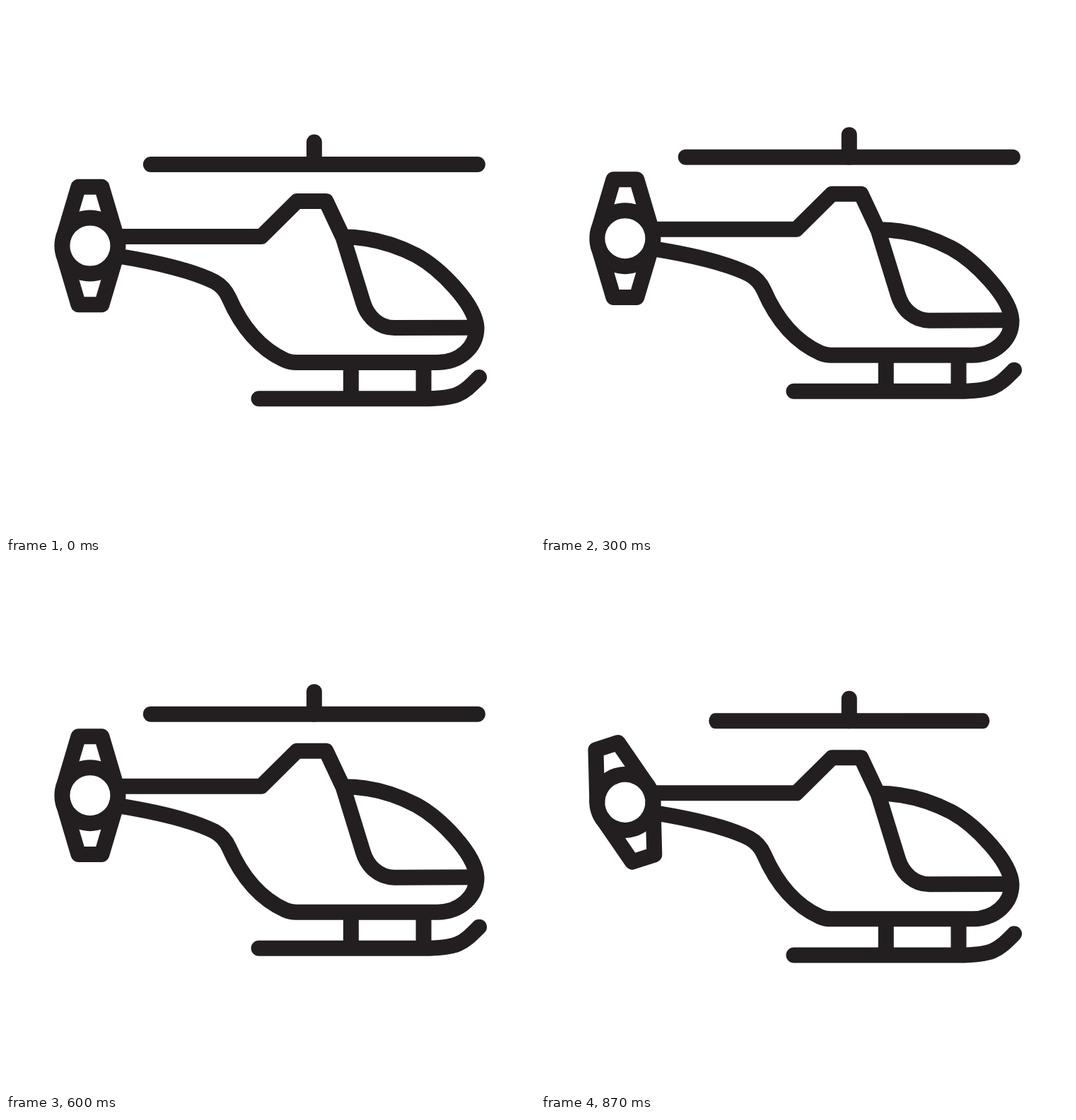
Animation of 748 by 748 pixels, one loop 900 ms. Source, as an HTML page:

```html
<!DOCTYPE html>
<html lang="en">
<head>
<meta charset="utf-8">
<title>Helicopter</title>
<style>
  html, body { margin: 0; width: 100%; height: 100%; overflow: hidden; background: #fff; }
  svg { display: block; width: 100vw; height: 100vh; }
  g { fill: none; stroke: #231f20; stroke-width: 22; stroke-linejoin: round; }
  .round { stroke-linecap: round; }
</style>
</head>
<body>
<svg viewBox="0 0 748 748">
  <g id="craft">
    <!-- fuselage -->
    <path d="M158 326H361L411.5 276H452.5L476.7 327.5L504.7 418.5C511 440 528 455 549 455L662 454.7"/>
    <path d="M476.7 326.5C516 326.5 550 337 580 352.5C614 371 664 422 665.5 455C665.5 482 642 504 610 504H410
             Q402 504 395 501C357 484 332 451 315 412C310 401 304 395 295 390C265 375 212 362 158 353.5"/>
    <!-- landing gear -->
    <path d="M487.8 504V555M590.5 504V555"/>
    <path class="round" d="M357.5 555.2H590C640 555.2 646 548 669 525"/>
    <!-- main rotor -->
    <path class="round" d="M435.8 192.5V224"/>
    <path class="round" id="rotor" d="M-231 0H231"/>
    <!-- tail rotor -->
    <g id="tail">
      <circle r="39.5"/>
      <path d="M-37.9 -11.1L-16.5 -83.3H16.5L37.9 -11.1M-37.9 11.1L-16.5 83.3H16.5L37.9 11.1"/>
    </g>
  </g>
</svg>
<script>
  const STEP = 30, STEPS = 30, BOB = 15, SPIN = 10, LIFT = 14;
  const [craft, rotor, tail] = ["craft", "rotor", "tail"].map(id => document.getElementById(id));
  const ease = x => x * x * (3 - 2 * x);
  // Rises from 0 to 1 and falls back once per period
  const triangle = (n, period) => 1 - Math.abs(1 - 2 * (n % period) / period);

  function draw() {
    const n = Math.floor(performance.now() / STEP) % STEPS;
    const lift = -LIFT * ease(triangle(n, BOB));
    const width = 1 - 0.9 * triangle(n, SPIN);
    craft.setAttribute("transform", `translate(0 ${lift})`);
    rotor.setAttribute("transform", `translate(435.8 224) scale(${width} 1)`);
    tail.setAttribute("transform", `translate(118.9 339) rotate(${n * 180 / SPIN})`);
    requestAnimationFrame(draw);
  }
  draw();
</script>
</body>
</html>
```
